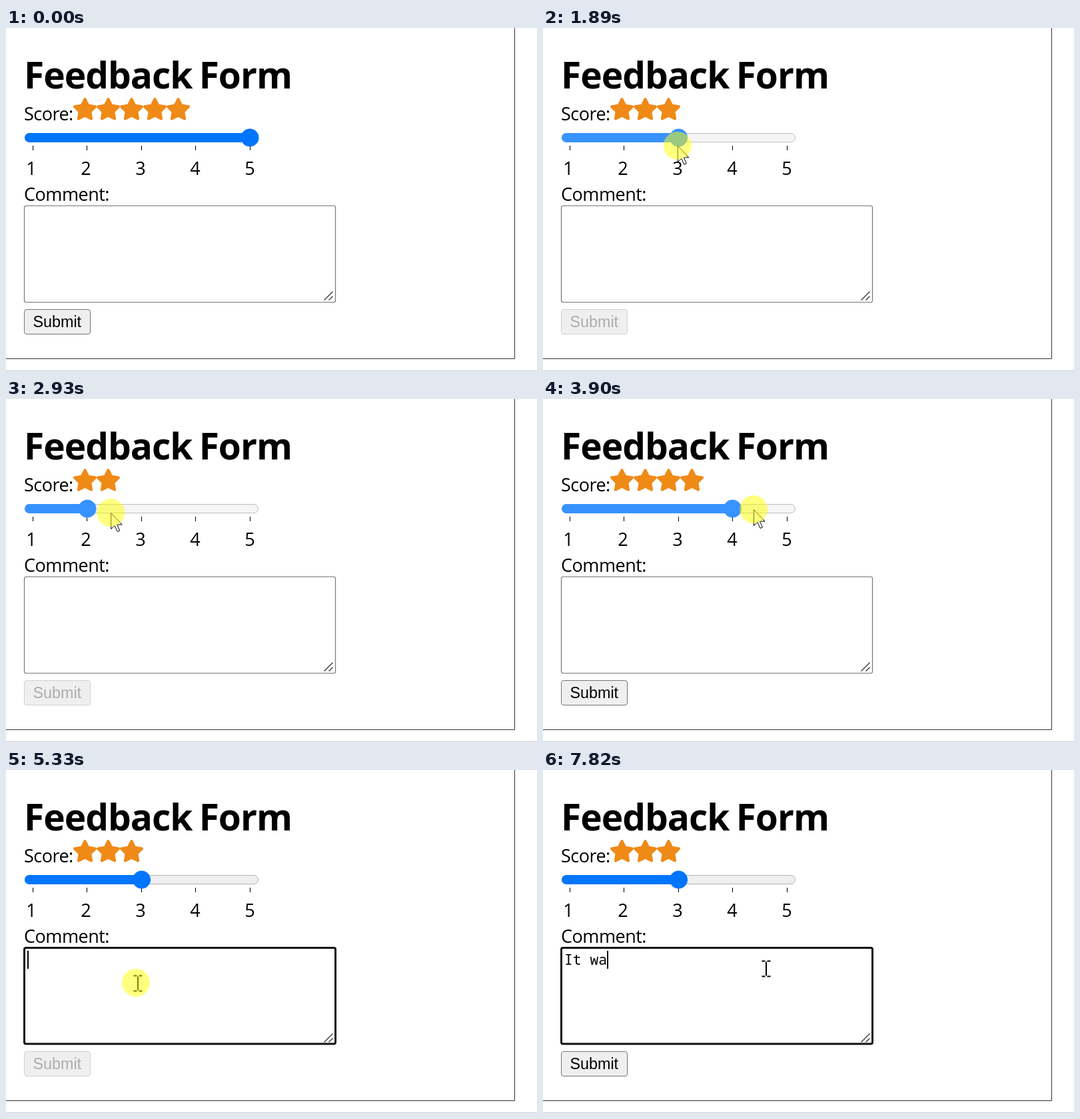
An HTML page that plays this animation: 797x516 px, repeating every 8 s.

```html
<!DOCTYPE html>
<html lang="en">
<head>
<meta charset="utf-8">
<title>Feedback Form</title>
<style>
  html, body { margin: 0; width: 100%; height: 100%; overflow: hidden; background: #fff; }
  svg { display: block; width: 100%; height: 100%; }
  text { font-family: "Open Sans", "Noto Sans", sans-serif; font-size: 27px; white-space: pre; }
  .title { font-size: 55px; font-weight: 700; letter-spacing: -1px; word-spacing: -3px; }
  .label { letter-spacing: -.5px; }
  .digit { text-anchor: middle; }
  .button { font-family: "Liberation Sans", Arial, sans-serif; font-size: 23.33px; }
  .typed { font-family: "Noto Sans Mono", "DejaVu Sans Mono", monospace; font-size: 21.38px; }
</style>
</head>
<body>
<svg viewBox="0 0 797 516">
  <path d="M763.5 0V497.5H0" fill="none" stroke="#333"/>
  <path d="M0 515.5H797" stroke="#ccc"/>

  <text class="title" x="27" y="91">Feedback Form</text>
  <text class="label" x="27" y="139">Score:</text>
  <g id="stars" fill="#ef8a17" stroke="#ef8a17" stroke-width="4" stroke-linejoin="round"></g>

  <g id="scale"></g>
  <rect id="track" x="28.5" y="158.5" width="350" height="13" rx="6.5"/>
  <rect id="bar" x="28" y="158" height="14" rx="7"/>
  <circle id="thumb" cy="165" r="13.5"/>

  <text class="label" x="27" y="260">Comment:</text>
  <rect id="area" fill="#fff"/>
  <path d="M477.5 409.5L490.5 396.5M484.5 409.5L490.5 403.5" stroke="#444" stroke-width="1.5"/>
  <text id="typed" class="typed" x="32" y="293"></text>
  <rect id="caret" y="272" width="2" height="27"/>

  <rect id="button" x="27.5" y="423.5" width="99" height="37" rx="3.5" fill="#efefef"/>
  <text id="buttonText" class="button" x="40.5" y="450">Submit</text>

  <g id="pointer">
    <path id="arrow" d="M.5 .5V24.5L6 19.5L10 28.5L13.5 27L9.5 18H17Z" fill="#fff" stroke="#000"/>
    <path id="beam" d="M-6.5 -11.5h5M1.5 -11.5h5M0 -10.5V10.5M-6.5 11.5h5M1.5 11.5h5" stroke="#000" stroke-width="2"/>
    <circle id="press" r="21" fill="#ff0" fill-opacity=".5"/>
  </g>
</svg>
<script>
const LOOP = 8000;
const FIRST_TICK = 40.5, TICK_GAP = 81.4;
const DRAG_START = 1400, DRAG_END = 4760;
const CHAR_WIDTH = 12.83;
const COMMENT = "It wa";
const KEY_TIMES = [6810, 7010, 7210, 7540, 7820];
const PRESSES = [[1270, DRAG_END], [5320, 5400]];

// time, x, y of the pointer
const PATH = [
  [370, 386, 431], [1140, 367, 157], [1370, 367, 157],
  [1890, 202, 177], [1970, 190, 173], [2180, 60, 171], [2380, 60, 171],
  [2930, 157, 171], [3210, 201, 171], [3900, 316, 166], [4250, 316, 166],
  [4520, 203, 173], [4730, 203, 173], [5000, 198, 321], [5340, 198, 321],
  [5600, 285, 421], [5890, 335, 299]
];

const $ = id => document.getElementById(id);
const tickX = score => FIRST_TICK + (score - 1) * TICK_GAP;
const clamp = (v, lo, hi) => Math.min(hi, Math.max(lo, v));
const within = (t, [from, to]) => t >= from && t < to;
const set = (id, attrs) => {
  for (const name in attrs) $(id).setAttribute(name, attrs[name]);
};
const show = (id, on) => set(id, { visibility: on ? "visible" : "hidden" });

function starPoints(cx, cy) {
  return Array.from({ length: 10 }, (_, i) => {
    const r = i % 2 ? 8.3 : 16.3, a = (i * 36 - 90) * Math.PI / 180;
    return (cx + r * Math.cos(a)).toFixed(2) + "," + (cy + r * Math.sin(a)).toFixed(2);
  }).join(" ");
}

function buildScale() {
  let stars = "", scale = "";
  for (let n = 1; n <= 5; n++) {
    const x = Math.floor(tickX(n)) + .5;
    stars += `<polygon points="${starPoints(83.5 + 35 * n, 123.3)}"/>`;
    scale += `<path d="M${x} 177V184" stroke="#000"/>` +
      `<text class="digit" x="${38 + 82 * (n - 1)}" y="221">${n}</text>`;
  }
  $("stars").innerHTML = stars;
  $("scale").innerHTML = scale;
}

function pointerAt(t) {
  const i = PATH.findIndex(p => p[0] > t);
  if (i < 0) return PATH[PATH.length - 1].slice(1);
  if (i === 0) return PATH[0].slice(1);
  const [t0, x0, y0] = PATH[i - 1], [t1, x1, y1] = PATH[i];
  const k = (t - t0) / (t1 - t0);
  return [x0 + (x1 - x0) * k, y0 + (y1 - y0) * k];
}

function scoreAt(t) {
  if (t < DRAG_START) return 5;
  const [x] = pointerAt(Math.min(t, DRAG_END));
  return clamp(Math.round((x - FIRST_TICK) / TICK_GAP) + 1, 1, 5);
}

function drawSlider(score, dragging, hovered) {
  const [blue, grey, edge] = dragging ? ["#3793ff", "#f5f5f5", "#bdbdbd"]
    : hovered ? ["#005cc8", "#e5e5e5", "#a0a0a0"]
    : ["#0075ff", "#efefef", "#b2b2b2"];
  const x = Math.round(tickX(score) * 2) / 2;
  set("track", { fill: grey, stroke: edge });
  set("bar", { fill: blue, width: x - 22 });
  set("thumb", { fill: blue, cx: x });
  [...$("stars").children].forEach((star, i) =>
    star.setAttribute("visibility", i < score ? "visible" : "hidden"));
}

function drawComment(t, count) {
  const focused = t >= 5320;
  set("area", focused
    ? { x: 27.5, y: 267.5, width: 467, height: 144.5, rx: 2.5, stroke: "#101010", "stroke-width": 3 }
    : { x: 27.5, y: 267.5, width: 467, height: 145, rx: 2.5, stroke: "#767676", "stroke-width": 1.2 });
  $("typed").textContent = COMMENT.slice(0, count);
  set("caret", { x: Math.round(32 + count * CHAR_WIDTH - .3) });
  show("caret", focused && !within(t, [6350, 6610]));
}

function drawButton(enabled) {
  set("button", { stroke: enabled ? "#767676" : "#d0d0d0" });
  set("buttonText", { fill: enabled ? "#000" : "#acacac" });
}

function drawPointer(t, x, y) {
  const overArea = x > 27 && x < 495 && y > 267 && y < 413;
  const pressed = PRESSES.some(span => within(t, span));
  set("pointer", { transform: `translate(${x.toFixed(1)} ${y.toFixed(1)})` });
  set("press", { cx: overArea ? -3 : 0, cy: overArea ? -1 : 0 });
  show("arrow", t >= 370 && !overArea);
  show("beam", t >= 370 && overArea);
  show("press", pressed);
}

function draw(t) {
  const [x, y] = pointerAt(t);
  const score = scoreAt(t);
  const count = KEY_TIMES.filter(k => t >= k).length;
  const hovered = t >= 370 && x > 28 && x < 381 && y > 151 && y < 179;
  drawSlider(score, within(t, [DRAG_START, DRAG_END]), hovered);
  drawComment(t, count);
  drawButton(score > 3 || count > 0);
  drawPointer(t, x, y);
}

buildScale();
const start = performance.now();
function tick() {
  draw((performance.now() - start) % LOOP);
  requestAnimationFrame(tick);
}
tick();
</script>
</body>
</html>
```
